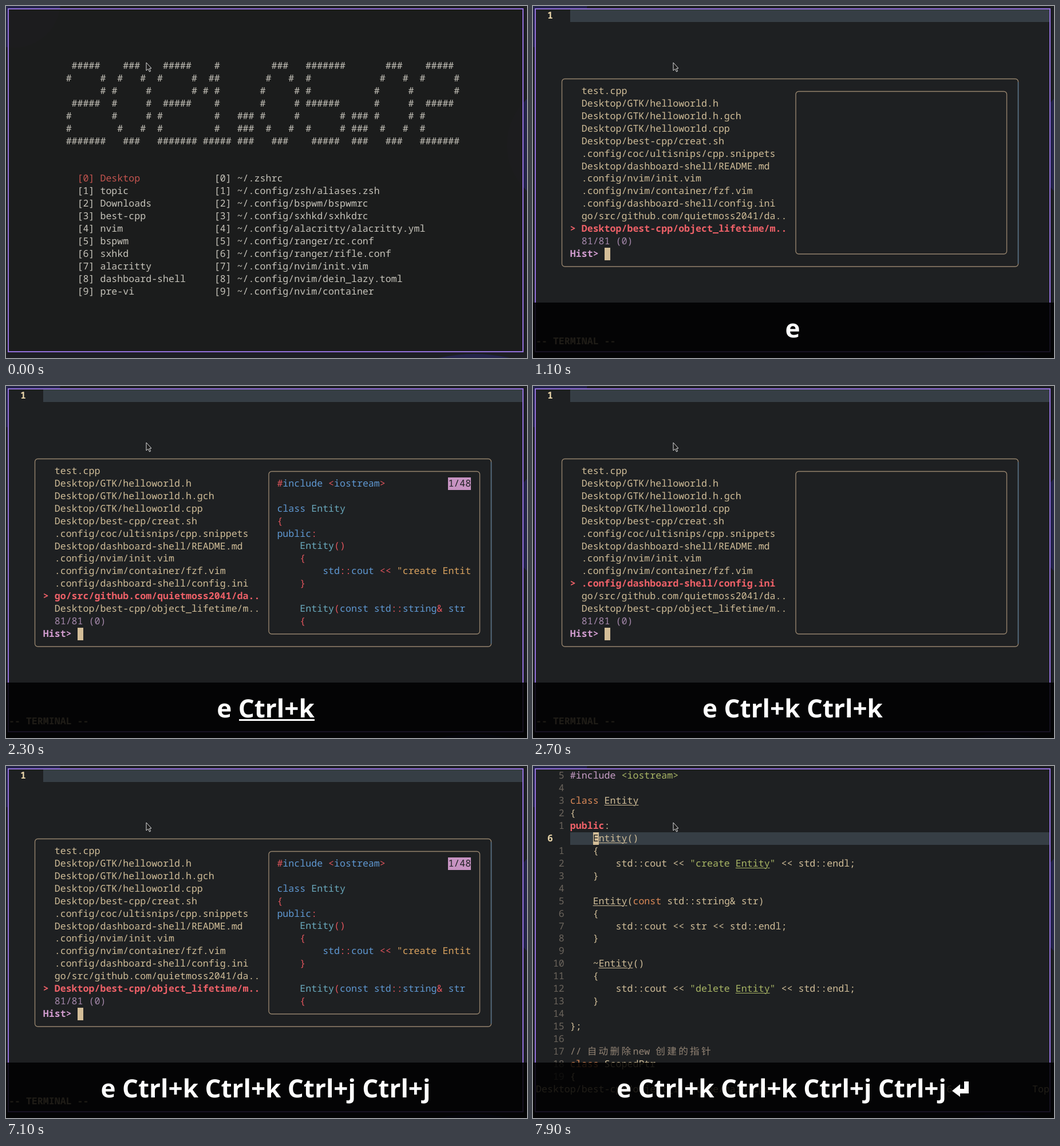
An HTML page for the animation above (8000 ms loop, 910 by 616 pixels).

```html
<!DOCTYPE html>
<html lang="en">
<head>
<meta charset="utf-8">
<title>Terminal history picker</title>
<style>
html, body { margin: 0; width: 100%; height: 100%; overflow: hidden; }
body { position: relative; background: #1d1e24; text-rendering: geometricPrecision; }
body *, .bar i { box-sizing: border-box; }
svg, pre, .cell, .layer, .wall, .window, .bar, .keys { position: absolute; margin: 0; }
svg, .wall, .layer { left: 0; top: 0; width: 910px; height: 616px; }
.window { left: 3px; top: 4px; width: 901px; height: 602px; border: 2px solid #9370db; background: rgba(28, 28, 28, .95); background-clip: padding-box; }
.vimbg { left: 5px; top: 6px; width: 897px; height: 598px; background: #1e2022; }

/* Terminal grid: --r is the row, --c the column */
pre {
  top: calc(5.3px + var(--r) * 21.93px);
  left: calc(5px + var(--c) * 9.966px);
  font: 16.61px/21.93px "Noto Sans Mono", "DejaVu Sans Mono", monospace;
  font-variant-ligatures: none;
  color: #d0bd98;
}
.cell {
  top: calc(6px + var(--r) * 21.93px);
  left: calc(5px + var(--c) * 9.966px);
  width: calc(var(--w, 1) * 9.966px);
  height: 22px;
  background: #d4be98;
}
.line { background: #363e45; width: auto; right: 8px; }
.badge { background: #c793c2; }
.dash pre { color: #c6c3ba; }
.hot, .dash .hot { color: #c4544f; }
.now { color: #e6d3a8; font-weight: bold; }
.nums { color: #6b645c; }
.dark { color: #1e2022; }
.info { color: #a588ab; }
.prompt { color: #cf9bcd; font-weight: bold; }
.pick { color: #ee6168; font-weight: bold; }
.kw { color: #5f98d2; }
.type { color: #6aa9bd; }
.op { color: #e0545c; }
.str { color: #d9a25f; }
.pre { color: #c79ec6; }
.green { color: #a9b665; }
.key { color: #dc8a58; }
.note { color: #928374; }
.han { letter-spacing: .2em; font-family: "Noto Sans CJK SC", "Noto Sans CJK", sans-serif; }
u { text-decoration-thickness: 1px; text-underline-offset: 2px; }

.bar { left: 0; top: 519px; width: 910px; height: 97px; background: rgba(0, 0, 0, .85); }
.keys { left: 0; top: 0; width: 907px; text-align: center; white-space: pre; color: #fff; font: bold 44px/88px "Noto Sans", "Open Sans", sans-serif; }
.keys span { position: relative; }
.keys i { position: absolute; left: 1px; right: 0; bottom: 7px; height: 3px; background: #fff; }
.keys svg { position: static; width: 39px; height: 44px; vertical-align: -12px; }

.on { opacity: 0; animation: 8s step-end infinite; }
.dash { animation-name: dash; }
.blip { animation-name: blip; }
.blip2 { animation-name: blip2; }
.shade { animation-name: shade; }
.back { animation-name: back; }
.empty { animation-name: empty; }
.popup { animation-name: popup; }
.low { animation-name: low; }
.mid { animation-name: mid; }
.high { animation-name: high; }
.code { animation-name: code; }
.conf { animation-name: conf; }
.edit { animation-name: edit; }
.k1 { animation-name: k1; }
.k4 { animation-name: k4; }
.k5 { animation-name: k5; }
@keyframes dash { 0% { opacity: 1 } 6.25% { opacity: 0 } }
@keyframes blip { 6.25% { opacity: 1 } 8.75% { opacity: 0 } }
@keyframes blip2 { 28.75% { opacity: 1 } 31.25% { opacity: 0 } }
@keyframes shade { 6.25%, 100% { opacity: 1 } }
@keyframes back { 13.75%, 100% { opacity: 1 } }
@keyframes empty { 13.75% { opacity: 1 } 98.75% { opacity: 0 } }
@keyframes popup { 13.75% { opacity: 1 } 93.75% { opacity: 0 } }
@keyframes low { 13.75% { opacity: 1 } 28.75% { opacity: 0 } 88.75% { opacity: 1 } 93.75% { opacity: 0 } }
@keyframes mid { 28.75% { opacity: 1 } 33.75% { opacity: 0 } }
@keyframes high { 33.75% { opacity: 1 } 88.75% { opacity: 0 } }
@keyframes code { 16.25% { opacity: 1 } 33.75% { opacity: 0 } 88.75% { opacity: 1 } 93.75% { opacity: 0 } }
@keyframes conf { 36.25% { opacity: 1 } 88.75% { opacity: 0 } }
@keyframes edit { 98.75%, 100% { opacity: 1 } }
@keyframes k1 { 6.25% { opacity: 1 } 28.75% { opacity: 0 } }
@keyframes k4 { 88.75% { opacity: 1 } 93.75% { opacity: 0 } }
@keyframes k5 { 93.75%, 100% { opacity: 1 } }
</style>
</head>
<body>
<svg class="wall" fill="#24244a">
  <circle cx="14" cy="-8" r="81"/><circle cx="985" cy="243" r="110"/><circle cx="818" cy="896" r="287"/>
</svg>
<div class="window"></div>

<div class="layer on dash">
  <pre id="date" style="--r:4;--c:10"></pre>
  <pre id="menu" style="--r:13;--c:12"></pre>
</div>
<div class="cell on blip" style="--r:0;--c:0;background:#cfcac6"></div>

<div class="layer on back vimbg" style="left:5px;top:6px;width:897px;height:598px"></div>
<div class="layer on empty">
  <div class="cell line" style="--r:0;--c:6"></div>
  <pre class="now" style="--r:0;--c:2">1</pre>
  <pre style="--r:26;--c:0;font-weight:bold">-- TERMINAL --</pre>
</div>

<div class="layer on popup">
  <svg fill="none" stroke="#95836d" stroke-width="1.4">
    <rect x="50.5" y="127.5" width="797" height="328.5" rx="5"/>
    <rect x="459" y="149.5" width="368.5" height="284.5" rx="5"/>
    <path d="M847.5 133V451" stroke="#52718a"/>
  </svg>
  <pre style="--r:6;--c:8">test.cpp
Desktop/GTK/helloworld.h
Desktop/GTK/helloworld.h.gch
Desktop/GTK/helloworld.cpp
Desktop/best-cpp/creat.sh
.config/coc/ultisnips/cpp.snippets
Desktop/dashboard-shell/README.md
.config/nvim/init.vim
.config/nvim/container/fzf.vim</pre>
  <pre class="info" style="--r:18;--c:8">81/81 (0)</pre>
  <pre class="prompt" style="--r:19;--c:6">Hist&gt;</pre>
  <div class="cell" style="--r:19;--c:12"></div>
  <pre class="on high" data-pick="0"></pre>
  <pre class="on mid" data-pick="1"></pre>
  <pre class="on low" data-pick="2"></pre>

  <div class="layer on code">
    <pre class="view" style="--r:7;--c:47">#include &lt;iostream&gt;

class Entity
{
public:
    Entity()
    {
        std::cout &lt;&lt; "create Entit
    }

    Entity(const std::string&amp; str
    {</pre>
    <div class="cell badge" style="--r:7;--c:77;--w:4"></div>
    <pre class="dark" style="--r:7;--c:77">1/48</pre>
  </div>
  <div class="layer on conf">
    <pre class="view" style="--r:7;--c:47">[editor]
name=nvim

[folders]
name = \
    ~/Desktop,\
    ~/Documents/topic,\
    ~/Downloads,\
    ~/Desktop/best-cpp,\
    ~/.config/nvim,\
    ~/.config/bspwm,\
    ~/.config/sxhkd,\</pre>
    <div class="cell badge" style="--r:7;--c:77;--w:4"></div>
    <pre class="dark" style="--r:7;--c:77">1/39</pre>
  </div>
</div>

<div class="layer on edit">
  <div class="cell line" style="--r:5;--c:6"></div>
  <div class="cell" style="--r:5;--c:10"></div>
  <pre id="nums" class="nums" style="--r:0;--c:2"></pre>
  <pre lang="zh-CN" style="--r:0;--c:6"><span class="pre">#include</span> <span class="green">&lt;iostream&gt;</span>

<span class="key">class</span> <u>Entity</u>
{
<span class="pick">public</span>:
    <u><span class="dark">E</span>ntity</u>()
    {
        std::cout &lt;&lt; <span class="green">"create <u>Entity</u>"</span> &lt;&lt; std::endl;
    }

    <u>Entity</u>(<span class="key">const</span> std::string&amp; str)
    {
        std::cout &lt;&lt; str &lt;&lt; std::endl;
    }

    ~<u>Entity</u>()
    {
        std::cout &lt;&lt; <span class="green">"delete <u>Entity</u>"</span> &lt;&lt; std::endl;
    }

};

<span class="note">// <span class="han">自动删除</span>new <span class="han">创建的指针</span></span>
<span class="key">class</span> ScopedPtr
{</pre>
  <pre style="--r:25;--c:0">Desktop/best-cpp/object_lifetime/main.cpp</pre>
  <pre style="--r:25;--c:72">6,5            Top</pre>
</div>

<div class="bar on shade">
  <div class="keys on k1"><span>e<i class="on blip"></i></span></div>
  <div class="keys on mid">e <span>Ctrl+k<i class="on blip2"></i></span></div>
  <div class="keys on high">e Ctrl+k Ctrl+k</div>
  <div class="keys on k4">e Ctrl+k Ctrl+k Ctrl+j Ctrl+j</div>
  <div class="keys on k5">e Ctrl+k Ctrl+k Ctrl+j Ctrl+j<svg viewBox="0 0 39 44" fill="#fff"><path d="M31 4H39V25H24V31L10 20.5 24 9V17H31Z"/></svg></div>
</div>

<svg><path d="M245 99V113L248.3 110.2 250.6 115 252.6 114 250.5 109.4 254 109Z" fill="#1c1c1c" stroke="#dcdcdc"/></svg>

<script>
const $ = id => document.getElementById(id);
const esc = s => s.replace(/&/g, '&amp;').replace(/</g, '&lt;');
const tag = (cls, s) => `<span class="${cls}">${esc(s)}</span>`;

// Banner date
const glyphs = {
  0: '  ###  | #   # |#     #|#     #|#     #| #   # |  ###  ',
  1: '  #  | ##  |# #  |  #  |  #  |  #  |#####',
  2: ' ##### |#     #|      #| ##### |#      |#      |#######',
  5: '#######|#      |#      |###### |      #|#     #| ##### ',
  '.': '   |   |   |   |###|###|###'
};
const art = [...'2021.05.02'].map(ch => glyphs[ch].split('|'));
$('date').textContent = art[0].map((_, row) => art.map(g => g[row]).join(' ')).join('\n');

// Start menu
const dirs = 'Desktop topic Downloads best-cpp nvim bspwm sxhkd alacritty dashboard-shell pre-vi'.split(' ');
const files = ('.zshrc .config/zsh/aliases.zsh .config/bspwm/bspwmrc .config/sxhkd/sxhkdrc ' +
  '.config/alacritty/alacritty.yml .config/ranger/rc.conf .config/ranger/rifle.conf ' +
  '.config/nvim/init.vim .config/nvim/dein_lazy.toml .config/nvim/container').split(' ');
$('menu').innerHTML = dirs.map((dir, i) => {
  const left = `[${i}] ${dir}`.padEnd(24);
  return (i ? left : tag('hot', left)) + `[${i}] ~/${files[i]}`;
}).join('\n');

// Last three history entries, one of them selected
const recent = [
  '.config/dashboard-shell/config.ini',
  'go/src/github.com/quietmoss2041/da..',
  'Desktop/best-cpp/object_lifetime/m..'
];
document.querySelectorAll('[data-pick]').forEach(el => {
  el.style.cssText = '--r:15;--c:6';
  el.innerHTML = recent.map((s, i) => i == el.dataset.pick ? tag('pick', '> ' + s) : '  ' + s).join('\n');
});

// Preview colours
const kind = s => s[0] == '"' ? 'str' : /^[A-Z]/.test(s) ? 'type' : /^[\w.,-]/.test(s) ? 'kw' : 'op';
document.querySelectorAll('.view').forEach(el => {
  el.innerHTML = el.textContent.replace(/"[^\n]*|[^\w\s.,"-]+|[A-Z]\w*|[\w.,-]+/g, s => tag(kind(s), s));
});

// Relative line numbers
$('nums').innerHTML = Array.from({ length: 25 }, (_, i) =>
  i == 5 ? tag('now', '6') : String(Math.abs(i - 5)).padStart(3)).join('\n');
</script>
</body>
</html>
```
